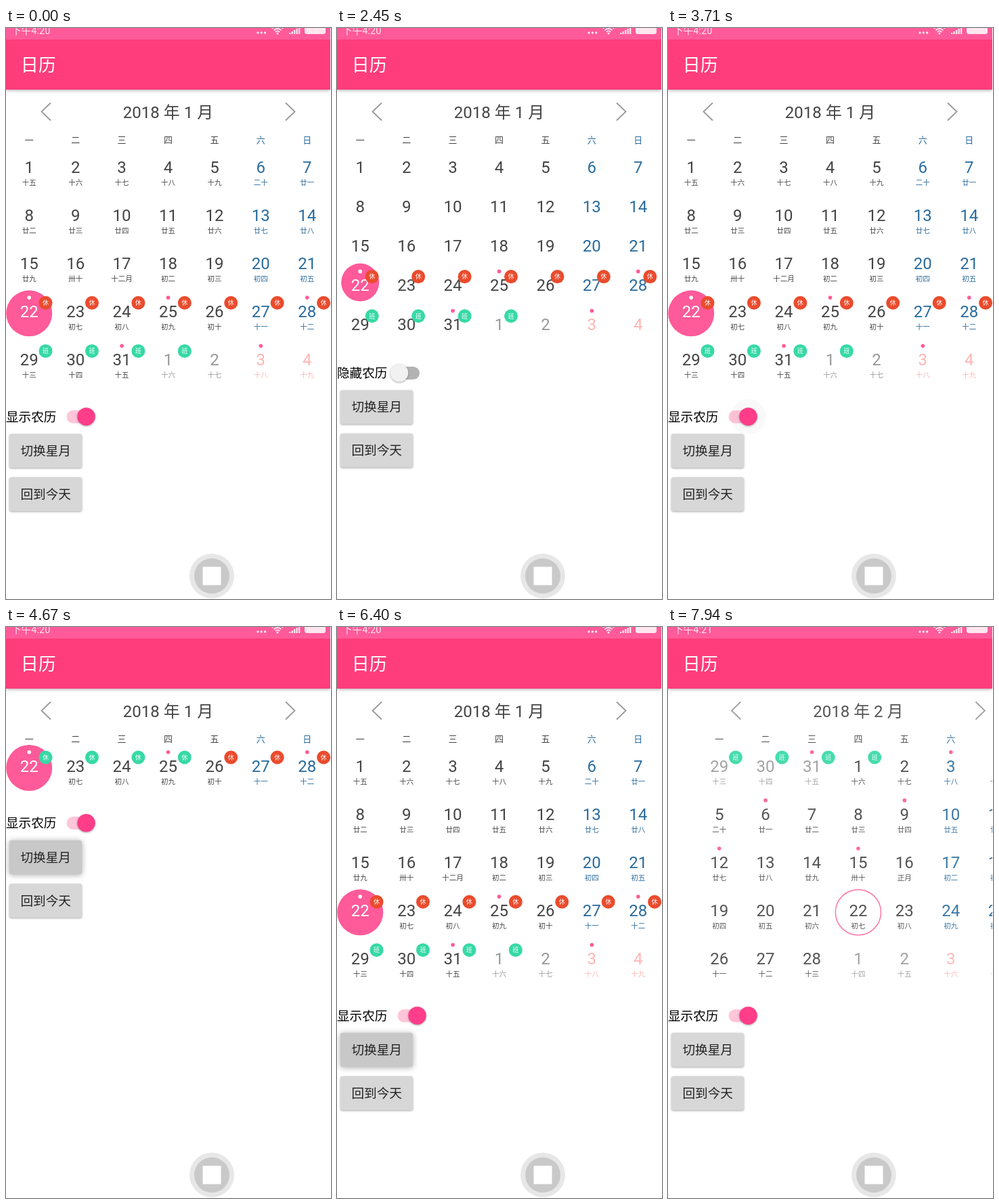
Recreate the animation shown at these times as an HTML page with a canvas. Size 480x843 px, loop 8 s.

```html
<!DOCTYPE html>
<html lang="zh-CN">
<head>
<meta charset="utf-8">
<style>
html, body { margin: 0; width: 100%; height: 100%; overflow: hidden; background: #fff; }
canvas { display: block; }
</style>
</head>
<body>
<canvas width="479" height="843"></canvas>
<script>
const c = document.querySelector('canvas').getContext('2d');
const LOOP = 8000, WIDTH = 479, COL = WIDTH / 7, TOP = 205;
const PINK = '#ff5a99', INK = '#444', BLUE = '#296b9e';
const NUMERALS = '一二三四五六七八九十';

const clamp = v => Math.max(0, Math.min(1, v));
const ease = p => (1 - Math.cos(Math.PI * clamp(p))) / 2;
const within = (t, a, b) => t >= a && t < b;
const mix = (a, b, p) => `rgb(${a.map((v, i) => Math.round(v + (b[i] - v) * p))})`;

function text(s, x, y, size, color, align = 'center') {
  c.font = `${size}px Roboto, "Noto Sans CJK SC", "Noto Sans CJK", sans-serif`;
  c.textAlign = align;
  c.fillStyle = color;
  c.fillText(s, x, Math.round(y + size * 0.36));
}

function disc(x, y, r, color) {
  c.fillStyle = color;
  c.beginPath();
  c.arc(x, y, r, 0, 7);
  c.fill();
}

function box(x, y, w, h, r, color) {
  c.fillStyle = color;
  c.beginPath();
  c.roundRect(x, y, w, h, r);
  c.fill();
}

function line(points, color, width) {
  c.strokeStyle = color;
  c.lineWidth = width;
  c.beginPath();
  points.forEach(p => c.lineTo(...p));
  c.stroke();
}

function withShadow(draw, blur = 3) {
  c.save();
  c.shadowColor = 'rgba(0,0,0,.35)';
  c.shadowBlur = blur;
  c.shadowOffsetY = 1;
  draw();
  c.restore();
}

// Days are counted from 1 January 2018, a Monday.
function dateOf(n) {
  if (n < 31) return { month: 1, day: n + 1 };
  return n < 59 ? { month: 2, day: n - 30 } : { month: 3, day: n - 58 };
}

function lunarName(n) {
  if (n === 16) return '十二月';
  if (n === 46) return '正月';
  const d = (n + 14) % 30 + 1;
  if (d === 20) return '二十';
  return (d < 11 ? '初' : d < 20 ? '十' : d < 30 ? '廿' : '卅') + NUMERALS[(d - 1) % 10];
}

function drawDay(n, x, y, month, lunar, week) {
  const { month: own, day } = dateOf(n);
  const weekend = n % 7 > 4, selected = month === 1 && n === 21;
  const cy = y + (lunar ? 3 : -4), r = lunar ? 34 : 28;
  let color = weekend ? BLUE : INK;
  if (own !== month) color = weekend ? '#ffb5b2' : '#999';
  if (selected) {
    disc(x, cy, r, PINK);
    color = '#fff';
  }
  if (month === 2 && n === 52) {
    c.strokeStyle = PINK;
    c.lineWidth = 1.4;
    c.beginPath();
    c.arc(x, cy, r - 0.4, 0, 7);
    c.stroke();
  }
  text(day, x, y, 24, color);
  if (lunar && !selected) text(lunarName(n), x, y + 23, 10.5, color);
  if (n % 3 === 0 && n > 20 && n < 46) disc(x, y - 20.2, 2.8, selected ? '#fff' : PINK);
  if (n > 20 && n < 32) {
    const bx = x + (lunar ? 24.3 : 17.5), by = y - 12.5;
    disc(bx, by, 10, n > 27 || (week && n < 25) ? '#36d9a5' : '#ea4b2d');
    text(n > 27 ? '班' : '休', bx, by, 9, '#fff');
  }
}

function drawPage(month, dx, alpha, lunar, week) {
  c.save();
  c.translate(dx, 0);
  c.globalAlpha = alpha;
  text(`2018 年 ${month} 月`, WIDTH / 2, 124, 24, INK);
  line([[66, 110.5], [52.5, 123.5], [66, 136.5]], '#999', 1.8);
  line([[413, 110.5], [426.5, 123.5], [413, 136.5]], '#999', 1.8);
  const first = month === 2 ? 28 : week ? 21 : 0;
  const center = i => (i + 0.5) * COL;
  for (let i = 0; i < 7; i++) {
    text('一二三四五六日'[i], center(i), 165, 13, i > 4 ? BLUE : INK);
  }
  for (let i = 0; i < (week ? 7 : 35); i++) {
    const y = TOP + Math.floor(i / 7) * (lunar ? 71.1 : 58.2);
    drawDay(first + i, center(i % 7), y, month, lunar, week);
  }
  c.restore();
}

function drawHeader(time) {
  withShadow(() => box(0, 0, WIDTH, 91, 0, '#ff3d7c'), 5);
  box(0, 0, WIDTH, 17, 0, PINK);
  text('日历', 21.8, 55, 26, '#fff', 'left');
  const pale = '#ffe6ef';
  text('下午' + time, 8, 3.8, 14.6, pale, 'left');
  for (const x of [372, 377.3, 382.6]) disc(x, 7, 1.7, pale);
  c.strokeStyle = pale;
  c.lineWidth = 1.8;
  for (const r of [4.5, 8, 11.5]) {
    c.beginPath();
    c.arc(401, 9, r, -2.35, -0.79);
    c.stroke();
  }
  disc(401, 8, 1.6, pale);
  for (let i = 0; i < 5; i++) box(418 + i * 3.5, 7 - i * 2, 2.3, 2 + i * 2, 0, pale);
  box(441, -3, 31, 12, 3.5, pale);
}

function drawSwitch(y, t, lunar) {
  const start = t < 3060 ? 1610 : 3060;
  const slide = ease((t - start) / 280);
  const p = t < 3060 ? 1 - slide : slide;
  const x = 92 + 26.5 * p;
  text(lunar ? '显示农历' : '隐藏农历', 0, y, 18.6, '#000', 'left');
  box(89.5, y - 9.5, 32.5, 19, 9.5, lunar ? '#ffc5d9' : '#b3b3b3');
  const ripple = Math.sin(Math.PI * clamp((t - start) / 840));
  disc(x, y, 26, `rgba(90,60,75,${0.05 * ripple})`);
  withShadow(() => disc(x, y - 0.3, 13.2, mix([241, 241, 241], [255, 61, 137], p)));
}

function drawButton(label, y, press) {
  withShadow(() => box(5, y, 107, 50, 3, mix([215, 215, 215], [200, 200, 200], press)), 3 + 5 * press);
  text(label, 58.7, y + 25, 18.6, '#222');
}

function draw(t) {
  const lunar = !within(t, 1610, 3060), week = within(t, 4670, 6400);
  c.fillStyle = '#fff';
  c.fillRect(0, 0, WIDTH, 843);

  if (t < 7580) {
    drawPage(1, 0, 1, lunar, week);
  } else {
    const step = 7580 + Math.floor((t - 7580) / 90) * 90;
    const p = ease((step - 7535) / 500);
    drawPage(1, -WIDTH * p, clamp(1 - 1.1 * p), true, false);
    drawPage(2, WIDTH * (1 - p), p, true, false);
  }
  drawHeader(t < 7580 ? '4:20' : '4:21');

  const y = 218.5 + (week ? 1 : 5) * (lunar ? 71.1 : 58.2);
  drawSwitch(y, t, lunar);
  let press = 0;
  if (within(t, 4670, 5330)) press = 1 - (t - 4670) / 660;
  if (within(t, 6400, 7060)) press = 1 - clamp((t - 6600) / 460);
  drawButton('切换星月', y + 25.3, press);
  drawButton('回到今天', y + 89.3, 0);

  disc(304, 809, 33, '#e7e7e7');
  disc(304, 809, 26, '#c9c9c9');
  box(290.5, 795.5, 27, 27, 0, '#fff');
}

function frame() {
  draw(performance.now() % LOOP);
  requestAnimationFrame(frame);
}
frame();
</script>
</body>
</html>
```
